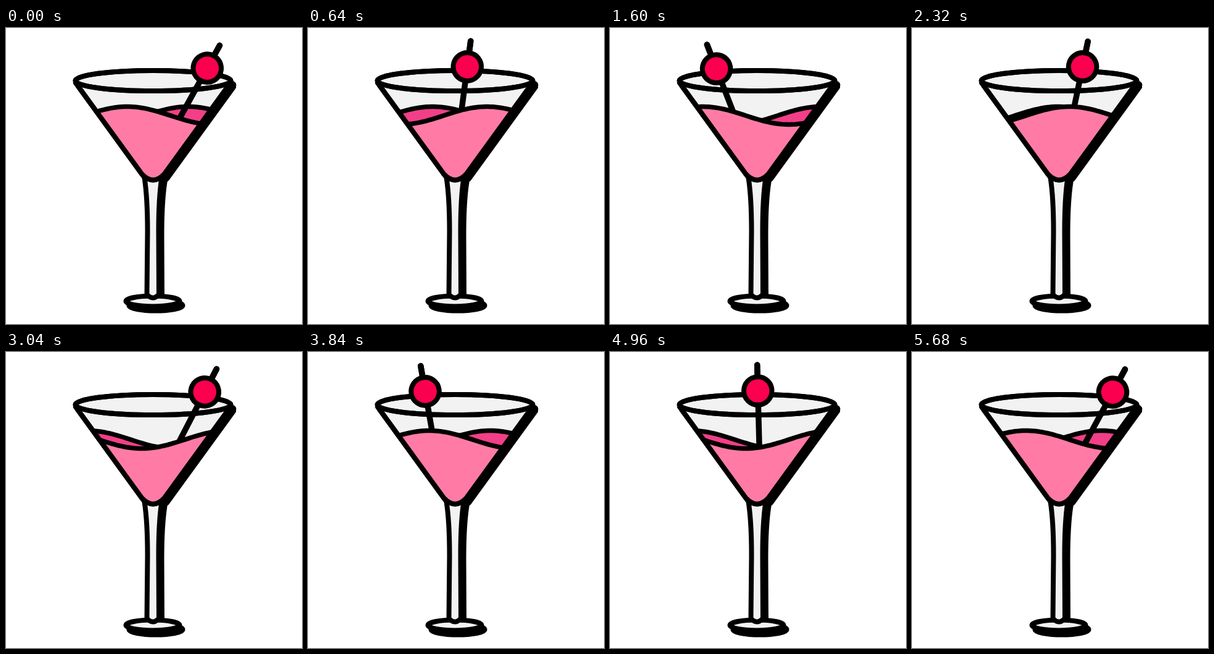
These frames come from a looping animation (480x480 px, 5.76 s). An HTML page:

```html
<!DOCTYPE html>
<html lang="en">
<head>
<meta charset="utf-8">
<title>Cocktail</title>
<style>
  html, body { margin: 0; width: 100%; height: 100%; overflow: hidden; background: #fff; }
  svg { display: block; width: 100vw; height: 100vh; }
  .ink { stroke: #000; stroke-width: 8; stroke-linejoin: round; stroke-linecap: round; }
  .wave { stroke-width: 7.5; }
  .stick { stroke-width: 9.5; }
</style>
</head>
<body>
<svg viewBox="0 0 480 480">
  <defs>
    <path id="bowl" d="M113 89 L220.500 237 Q238.500 256 256.500 237 L364 89"/>
    <ellipse id="rim" cx="238.5" cy="85.5" rx="126" ry="16.5"/>
    <path id="stem" d="M224.500 243 Q229.500 275 229.500 330 L228.500 432 Q238 443 248 432 L247.500 330 Q247.500 275 252.500 243"/>
    <ellipse id="foot" cx="238" cy="443" rx="43.500" ry="8.500"/>
    <clipPath id="inside"><use href="#bowl"/></clipPath>
  </defs>

  <g class="ink" fill="#000" transform="translate(5 7)">
    <use href="#foot"/><use href="#stem"/><use href="#bowl"/><use href="#rim"/>
  </g>
  <g class="ink" fill="#f2f2f2">
    <use href="#foot"/><use href="#stem"/><use href="#bowl"/><use href="#rim"/>
  </g>

  <g clip-path="url(#inside)"><path id="back" class="ink wave" fill="#f23f88"/></g>
  <line id="stick" class="ink stick" y1="-42" y2="105"/>
  <g clip-path="url(#inside)"><path id="front" class="ink wave" fill="#ff7ba6"/></g>

  <g class="ink" fill="none"><use href="#bowl"/><use href="#rim"/></g>
  <g id="pick">
    <line class="ink stick" y1="-42" y2="0"/>
    <circle class="ink" r="22.800" fill="#fb004e"/>
  </g>
</svg>
<script>
  const LOOP = 5760, STEP = 80, SWING = 2880, SLOSH = 1920;
  const WAVE = { mid: 246, crest: 338, length: 280, level: 142, height: 14.5 };

  // Where the stick meets the drink: [ms, x] over one swing.
  const DRIFT = [[0, 279], [160, 278], [320, 271], [640, 247], [960, 205],
                 [1280, 201], [1600, 206], [2080, 242], [2560, 273], [2800, 279]];

  const $ = id => document.getElementById(id);
  const [back, front, stick, pick] = ['back', 'front', 'stick', 'pick'].map($);

  // Periodic point lookup, so the curve joins up at the ends.
  function knot(i) {
    const n = DRIFT.length, turn = Math.floor(i / n);
    const [t, x] = DRIFT[i - turn * n];
    return [t + turn * SWING, x];
  }

  function slope(i) {
    const [t0, x0] = knot(i - 1), [t1, x1] = knot(i + 1);
    return (x1 - x0) / (t1 - t0);
  }

  function drift(t) {
    let i = DRIFT.length - 1;
    while (DRIFT[i][0] > t) i--;
    const [t0, x0] = knot(i), [t1, x1] = knot(i + 1);
    const d = t1 - t0, p = (t - t0) / d, q = 1 - p;
    return x0 * q * q * (1 + 2 * p) + x1 * p * p * (3 - 2 * p)
         + d * p * q * (slope(i) * q - slope(i + 1) * p);
  }

  // dir 1 travels right, -1 is its mirror image.
  function wavePath(t, dir) {
    const turns = (t - WAVE.crest) / SLOSH;
    let d = 'M100 270';
    for (let x = 100; x <= 380; x += 4) {
      const a = 2 * Math.PI * ((x - WAVE.mid) * dir / WAVE.length - turns);
      d += `L${x} ${(WAVE.level - WAVE.height * Math.cos(a)).toFixed(2)}`;
    }
    return d + 'L380 270Z';
  }

  function draw(t) {
    front.setAttribute('d', wavePath(t, 1));
    back.setAttribute('d', wavePath(t, -1));

    const s = t % SWING;
    const tilt = 3 + 25.8 * Math.cos(2 * Math.PI * s / SWING);
    const x = drift(s) + 86 * Math.tan(tilt * Math.PI / 180);
    const y = 62.8 + 0.0045 * (tilt - 6) ** 2;
    const place = `translate(${x.toFixed(2)} ${y.toFixed(2)}) rotate(${tilt.toFixed(2)})`;
    stick.setAttribute('transform', place);
    pick.setAttribute('transform', place);
  }

  const start = performance.now();
  function tick() {
    const t = (performance.now() - start) % LOOP;
    draw(Math.floor(t / STEP) * STEP);
    requestAnimationFrame(tick);
  }
  tick();
</script>
</body>
</html>
```
